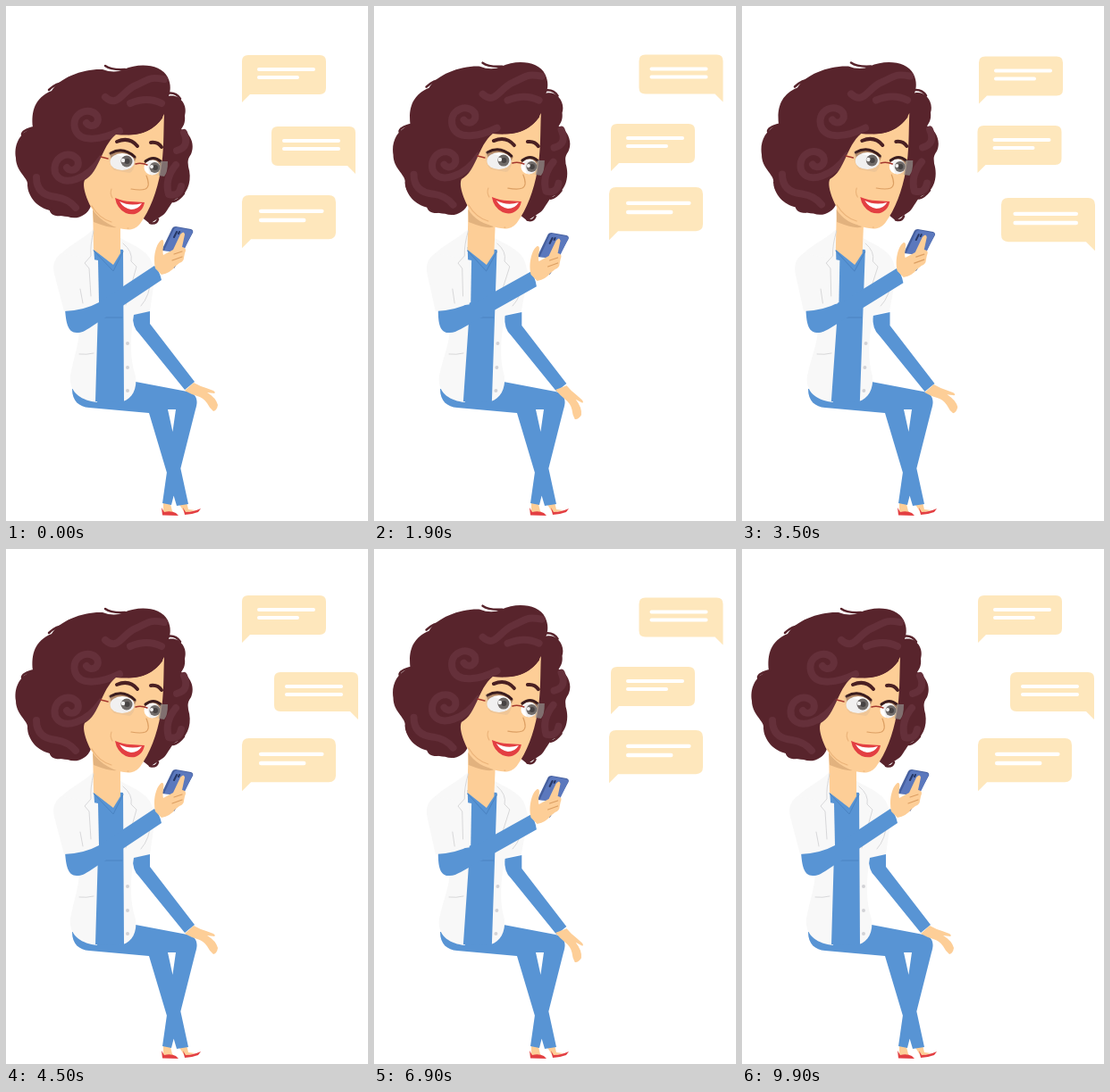
Write an HTML page that moves like this. It is 405 by 577 pixels and loops after 10 s.

```html
<!DOCTYPE html>
<html lang="en">
<head>
<meta charset="utf-8">
<style>
html, body { margin: 0; width: 100%; height: 100%; overflow: hidden; background: #fff }
svg { display: block }
.skin { fill: #fdce97 } .blue { fill: #5894d4 } .coat { fill: #f8f8f8 } .hair { fill: #58242c } .red { fill: #e33f42 }
.line { fill: none; stroke-linecap: round; stroke-linejoin: round }
.seam { stroke: #d4d4d6; stroke-width: .9 } .curl { stroke: #65303a; stroke-width: 8 }
.crease { stroke: #dc9f63; stroke-width: 1.2 } .wisp { stroke: #58242c; stroke-width: 2.5 }
</style>
</head>
<body>
<svg width="405" height="577" viewBox="0 0 405 577">
  <g id="legs">
    <path class="skin" d="M176 556l8 2 2 8 5 4-15-2zM193 557l9-1 2 8 8 1-12 3z"/>
    <path class="red" d="M174 562l3 5q7-2 13 1l3 3-18-.5zM198 562l3 5q8 0 17-4l-3 4q-8 3-15 3z"/>
    <path class="blue" d="M74 429C74 443 82 449 93 450L160 456 191 560 204 558 181 452 190 452 175 557 185 559 212 452C216 440 212 434 203 432L145 421 100 425Z"/>
  </g>
  <g id="farArm">
    <path class="blue" d="M142 345L161 341 161 356 211 421 200 430 149 367Q141 360 142 345Z"/>
    <path id="farHand" class="skin" d="M200 431L210 422Q217 426 224 428L232 431Q235 433 233 434L225 433Q235 439 237 447 236 453 232 454 228 451 225 445 221 439 214 437 207 435 200 431Z"/>
  </g>
  <g id="torso">
    <path class="coat" d="M128 260C140 267 158 273 163 287L167 300 161 342 143 346C139 370 138 394 145 415 147 429 141 440 131 443L128 350Z"/>
    <path class="coat" d="M98 250C82 265 60 272 54 290L82 360C82 378 76 392 72 414 70 433 84 442 102 444L110 340Z"/>
    <path class="blue" d="M98 270L131 273 132 443Q115 445 100 443L103 340Z"/>
    <path class="skin" d="M97 220L128 240 128 277 120 290 98 273Z"/>
    <path fill="#e2b27e" d="M97 228Q108 244 127 246 124 252 98 242Z"/>
    <path class="line" stroke="#4a83c2" d="M98 274L120 297 131 275M108 349h22"/>
    <path class="line seam" d="M131 266Q142 275 140 286L146 292 134 335M82 390q8 1 16-1M162 305q-1 20-11 31"/>
    <g fill="#d2d2d6"><circle cx="136" cy="378" r="2"/><circle cx="136" cy="405" r="2"/><circle cx="136" cy="431" r="2"/></g>
  </g>
  <g id="nearArm">
    <path class="blue" d="M66 339C67 354 69 366 79 366 85 366 88 364 93 361L174 307Q172 297 166 291L104 332Z"/>
    <g id="hand">
      <path fill="#3d568f" d="M185 291l3 3 2-3z"/>
      <path fill="#46609f" d="M174 274L186 249Q187 247 190 247L207 250Q210 251 209 254L197 276Z"/>
      <path fill="#5b78bd" d="M177 274L188 250Q189 248 191 248L207 251Q210 252 208 255L198 276Z"/>
      <path class="line" stroke="#263765" stroke-width="2" d="M191 253l-3 6M194 253l-1 2"/>
      <path class="skin" d="M167 294C164 281 168 266 174 262 179 261 174 273 176 279L187 273 195 256Q199 251 200 256L197 270Q203 271 200 277L199 282Q199 286 194 288L189 292Q184 299 174 301Z"/>
      <path class="line crease" d="M188 278l9-3M186 285l11-4"/>
    </g>
  </g>
  <g id="sleeve">
    <path class="coat" d="M62 277C53 284 52 291 54 300L65 342Q88 341 104 332L103 285Z"/>
    <path class="line seam" d="M83 317l3 16M98 252Q94 268 95 280L88 288 93 294 95 325"/>
  </g>
  <g id="hair">
    <path class="hair" d="M132 71C149 63 174 65 181 80 185 88 184 96 182 101 193 98 204 110 200 123 201 131 198 135 196 138 206 142 212 155 207 166 202 173 204 176 204 180 208 193 205 208 194 215 184 216 182 232 173 236L161 244 150 235 150 205 110 200 95 224C91 235 79 240 69 236 60 235 54 235 49 229 36 226 25 215 24 201 26 193 11 186 11 170 9 158 13 143 30 136 28 118 32 103 51 95 60 80 87 70 108 71Q121 76 132 71Z"/>
    <path class="line wisp" d="M111 67q7 5 22 4M180 98q10-2 15 6M48 94q8-8 18-8M18 144q0-5 14-8M26 205q2 9 12 7M50 226q-1 8 10 8M161 243q7 2 9-4M199 210q-6 8-12 9"/>
    <path class="line curl" d="M127 140C109 149 82 155 77 137 73 119 94 112 102 123 106 134 94 137 90 131M107 171C92 193 63 205 55 187 51 169 71 160 80 172 84 183 72 187 68 181M111 102C125 115 130 95 145 89 161 82 160 79 177 82M139 109q19-8 35 0M34 192q0 20 22 22 14 2 22 12M190 178q-13 16-8 33 12 3 14-9M199 142q7 16-8 20"/>
  </g>
  <g id="face">
    <path class="skin" d="M177 121C176 142 177 164 173 185 169 208 161 229 150 244 144 251 138 251 132 250 116 248 99 236 92 219 87 207 86 199 88 195 105 186 106 158 123 144 142 146 166 144 177 121Z"/>
    <path class="line wisp" stroke-width="1.500" d="M137 143q22 1 37-18"/>
    <path class="line crease" opacity=".55" d="M118 205q-2 5 1 10M136 249h1M96 224q8 14 22 18"/>
    <path class="line" stroke="#4a2022" stroke-width="4" d="M124 152Q138 146 147 157M162 153Q170 152 174 158"/>
    <path fill="#b58a67" d="M116 166Q130 154 146 170L144 174 118 172ZM155 175Q164 166 174 174L173 181 156 181Z"/>
    <ellipse cx="130" cy="174.500" rx="13.500" ry="9.500" fill="#fff"/><ellipse cx="163.500" cy="181" rx="9" ry="8.500" fill="#fff"/>
    <g fill="#6b6664"><circle cx="135" cy="174" r="6.500"/><circle cx="166.500" cy="181" r="6"/></g>
    <g fill="#3c3838"><circle cx="135.500" cy="174" r="3"/><circle cx="167" cy="181" r="3"/></g>
    <g fill="#fff"><circle cx="131" cy="173" r="2.200"/><circle cx="163" cy="180" r="2"/></g>
    <path class="line" stroke="#3a1c1e" stroke-width="3" d="M117 165Q131 157 144 169M156 174Q165 167 173 174"/>
    <path fill="#948d88" fill-opacity=".13" d="M114 163L145 174Q143 186 138 187L121 184Q115 180 114 163ZM157 175L173 174 171 190 161 189Z"/>
    <path fill="#8d8885" fill-opacity=".75" d="M173 174l8 0q0 13-4 17l-6-1z"/>
    <path class="line" stroke="#a3372d" stroke-width="1.500" d="M106 169l8 2M145 177q6-2 13 1"/>
    <path class="line crease" stroke-width="1.500" d="M157 190Q162 202 156 205 151 207 140 205"/>
    <path class="red" d="M122 215Q132 219 139 219L155 220C153 231 144 236 134 232Q124 227 122 215Z"/>
    <path fill="#fff" d="M127 219Q139 225 152 221 148 228 140 228 132 227 127 219Z"/>
  </g>
  <g id="chat"></g>
</svg>
<script>
const $ = id => document.getElementById(id);
const set = (id, transform) => $(id).setAttribute('transform', transform);
const clamp = x => Math.max(0, Math.min(1, x));
const ease = x => (1 - Math.cos(Math.PI * clamp(x))) / 2;
const mix = (a, b, p) => a + (b - a) * p;
const swing = (t, up, top, down, end) => ease((t - up) / (top - up)) - ease((t - down) / (end - down));
const backOut = x => 1 + 2.55 * (x - 1) ** 3 + 1.55 * (x - 1) ** 2;

const PERIOD = 5000, BIG = 1.117, MOVE = 450, POP = 400;
// Each resting layout, top to bottom: [side, tail x, top y]
const layouts = [
  [[1, 264, 55], [-1, 391, 135], [1, 264, 212]],
  [[-1, 390.5, 54.5], [1, 265, 132], [1, 263, 203]],
  [[1, 265, 56.5], [1, 263.5, 134], [-1, 395, 215]],
  [[1, 264, 52], [-1, 394, 138], [1, 264, 212]]
];
const starts = [0, 1950, 3550];

function bubble([side, x, y], size, pop = 1) {
  if (pop <= 0) return '';
  const second = side > 0 ? 63 : 81;
  return `<g transform="translate(${x} ${y}) scale(${side * size} ${size}) translate(0 53) scale(${pop}) translate(0 -53)">
    <path fill="#fee7bc" d="M0 53V7Q0 0 7 0H87Q94 0 94 7V37Q94 44 87 44H9Z"/>
    <path class="line" stroke="#fff" stroke-width="4" d="M19 16H80M19 25H${second - 1}"/></g>`;
}

function chat(t) {
  const k = starts.findLastIndex(s => t >= s);
  const from = layouts[k], to = layouts[k + 1], dt = t - starts[k];
  const p = ease(dt / MOVE);
  const moved = [1, 2].map(i => {
    const [side, x, y] = from[i], [, x2, y2] = to[i - 1];
    return bubble([side, mix(x, x2, p), mix(y, y2, p)], i == 2 ? mix(BIG, 1, p) : 1);
  });
  const grow = dt > MOVE ? backOut(clamp((dt - MOVE) / POP)) : 0;
  return bubble(from[0], 1, 1 - ease(dt / 220)) + moved.join('') + bubble(to[2], BIG, grow);
}

function draw(now) {
  const t = now % PERIOD;
  const lean = swing(t, 600, 2100, 3600, 4450);
  const reach = swing(t, 600, 1900, 3100, 3850);
  const drop = swing(t, 600, 2000, 2750, 3600);
  const k = .041 * lean, skew = `matrix(1 0 ${-k} 1 ${440 * k} 0)`;
  set('torso', skew);
  set('sleeve', skew);
  set('hair', `translate(${11 * lean} ${-3.5 * lean})`);
  set('face', `translate(${10.3 * lean} ${-lean})`);
  set('farArm', `translate(${4.5 * lean} ${2 * lean})`);
  set('farHand', `rotate(${21 * drop} 207 426)`);
  // The phone keeps its tilt while the forearm turns at the elbow
  set('nearArm', `translate(${5 * lean} 0) rotate(${4.3 * reach} 78 352)`);
  set('hand', `rotate(${-4.3 * reach} 169 298)`);
  $('chat').innerHTML = chat(t);
}

const begin = performance.now();
function loop() {
  draw(performance.now() - begin);
  requestAnimationFrame(loop);
}
loop();
</script>
</body>
</html>
```
